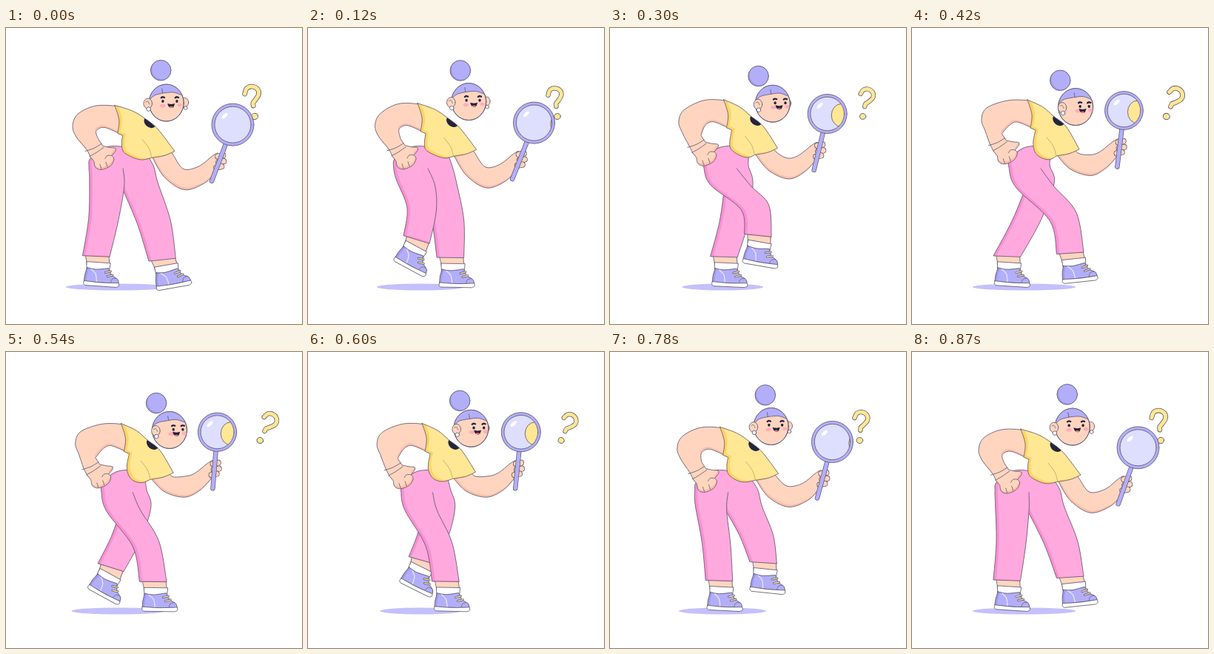
An HTML page with a canvas that plays this animation: 400 by 400 pixels, repeating every 900 ms.

```html
<!DOCTYPE html>
<html lang="en">
<head>
<meta charset="utf-8">
<title>Walking with a magnifying glass</title>
<style>
html, body { margin: 0; width: 100%; height: 100%; overflow: hidden; background: #fff; }
canvas { display: block; width: 400px; height: 400px; }
</style>
</head>
<body>
<canvas id="stage" width="400" height="400"></canvas>
<script>
const ctx = document.getElementById('stage').getContext('2d');
const LOOP = 900, STEP = 30, STRIDE = LOOP / 2;
const INK = '#595468', SKIN = '#ffd5c0', SKIN_DARK = '#fdbfa9', LILAC = '#b3aef9',
  LILAC_DARK = '#9f99ef', PINK = '#ffa9df', PINK_DARK = '#fa8fd1',
  YELLOW = '#ffe794', YELLOW_DARK = '#ffd466', DARK = '#24243c';

let time = 0;

// One swing per loop, highest at the given time.
const wave = (mean, amp, peak) => mean + amp * Math.cos(2 * Math.PI * (time - peak) / LOOP);
// Two bounces per loop, lowest on screen when a foot lands.
const bob = amp => amp * Math.cos(4 * Math.PI * time / LOOP);
const mix = (a, b, u) => a + (b - a) * u;
const mid = (a, b, dx = 0, dy = 0) => [mix(a[0], b[0], .5) + dx, mix(a[1], b[1], .5) + dy];
const smooth = u => {
  u = Math.min(1, Math.max(0, u));
  return u * u * (3 - 2 * u);
};
const rad = deg => deg * Math.PI / 180;
const at = (x, y) => (dx, dy) => [x + dx, y + dy];

// Appends a smooth curve through the points.
function spline(path, pts, join) {
  path[join ? 'lineTo' : 'moveTo'](...pts[0]);
  for (let i = 0; i < pts.length - 1; i++) {
    const b = pts[i], c = pts[i + 1], a = pts[i - 1] || b, d = pts[i + 2] || c;
    path.bezierCurveTo(b[0] + (c[0] - a[0]) / 6, b[1] + (c[1] - a[1]) / 6,
      c[0] - (d[0] - b[0]) / 6, c[1] - (d[1] - b[1]) / 6, ...c);
  }
  return path;
}
function joined(...runs) {
  const path = new Path2D();
  runs.forEach((run, i) => spline(path, run, i > 0));
  return path;
}
function closed(...runs) {
  const path = joined(...runs);
  path.closePath();
  return path;
}
function oval(x, y, rx, ry = rx, angle = 0) {
  const path = new Path2D();
  path.ellipse(x, y, rx, ry, angle, 0, 2 * Math.PI);
  return path;
}
function fill(path, color) {
  ctx.fillStyle = color;
  ctx.fill(path);
}
function stroke(path, color = INK, width = .8) {
  ctx.strokeStyle = color;
  ctx.lineWidth = width;
  ctx.stroke(path);
}
function paint(path, color) {
  fill(path, color);
  stroke(path);
}
function tube(path, color, width) {
  stroke(path, INK, width + 1.4);
  stroke(path, color, width);
}
function inside(path, draw) {
  ctx.save();
  ctx.clip(path);
  draw();
  ctx.restore();
}
function shaded(path, light, dark, dx, dy = 0) {
  fill(path, dark);
  inside(path, () => {
    ctx.translate(dx, dy);
    fill(path, light);
  });
}
function placed(x, y, deg, draw) {
  ctx.save();
  ctx.translate(x, y);
  ctx.rotate(rad(deg));
  draw();
  ctx.restore();
}

// Middle of the sole: it glides back on the ground, then swings forward in an arc.
function footPose(landing) {
  const s = (time - landing + LOOP) % LOOP;
  if (s <= STRIDE) {
    const u = s / STRIDE;
    return [mix(227, 128, u), 351 - 2 * u, 4 * u - 10 * Math.max(0, 1 - s / 90)];
  }
  const u = s / STRIDE - 1;
  return [mix(128, 227, smooth((u - .13) / .8)), 350 - 33 * Math.sin(Math.PI * u),
    mix(4, -10, u) + 28 * Math.sin(Math.PI * Math.sqrt(u))];
}

function hem([x, y, deg]) {
  const a = rad(deg), b = rad(deg * .6);
  const cx = x - 9 * Math.cos(a) + 40 * Math.sin(a);
  const cy = y - 9 * Math.sin(a) - 40 * Math.cos(a);
  const dx = 18.3 * Math.cos(b), dy = 18.3 * Math.sin(b);
  return [[cx - dx, cy - dy], [cx + dx, cy + dy]];
}

function drawShoe(pose) {
  placed(...pose, () => {
    paint(closed([[-24, -44], [8, -44]], [[10, -28], [-20, -28]]), SKIN);
    paint(closed([[-21, -32], [11, -32]], [[10, -20], [-20, -20]]), '#fff');
    const upper = closed([[-20, -24], [-8, -22.5], [9, -25]],
      [[9, -25], [14, -16], [22, -11], [24, -5]], [[-23, -5], [-22.5, -14], [-20, -24]]);
    shaded(upper, LILAC, LILAC_DARK, 3);
    stroke(upper);
    stroke(joined([[-14, -22], [-8, -16], [-6, -6]]), '#e6e4ff', 1.3);
    stroke(joined([[13, -6], [15, -11], [20, -12]]), INK, .6);
    for (const lace of [at(7, -19), at(10, -14)]) tube(joined([lace(-2, 0), lace(5, -2)]), YELLOW, 1.3);
    paint(closed([[-23, -6], [0, -5], [24, -6]], [[24, -6], [24.5, -2], [21, 0]],
      [[-21, 0], [-23.5, -2], [-23, -6]]), '#fff');
  });
}

function drawFarLeg() {
  const foot = footPose(0), [left, right] = hem(foot);
  const hip = [wave(199, 7, 830), 209], crotch = [155, 212];
  const sides = [
    [[188, 168], [hip[0] - 6, 186], hip, mid(hip, right, 5), right],
    [left, mid(crotch, left, 3), crotch]
  ];
  drawShoe(foot);
  shaded(closed(...sides, [[150, 170]]), PINK, PINK_DARK, 4);
  stroke(joined(...sides));
}

function drawNearLeg() {
  const foot = footPose(STRIDE), [left, right] = hem(foot);
  const waist = at(wave(121.5, 9.5, 440), 188), bend = wave(10.5, 8.5, 360);
  const hip = [wave(126.5, 14, 420), wave(210, 6, 470)];
  const seam = [wave(166, 8, 420), 190], thigh = [wave(175, 18, 370), 214];
  const outer = [[186, 168], waist(42, -28), waist(20, -26), waist(2, -12), waist(0, 0),
    hip, mid(hip, left, bend), left];
  const inner = [right, mid(thigh, right, bend * .55, -bend * .5), thigh, seam];
  drawShoe(foot);
  shaded(closed(outer, inner), PINK, PINK_DARK, 4, -1);
  stroke(joined(outer, inner));
}

function torsoPose() {
  return {
    shoulder: [wave(151.5, 4.7, 460), wave(99.2, 3.7, 10) + bob(1.5)],
    sleeve: [wave(227, 1, 0), wave(163.7, 1.2, 0) + bob(1.5)],
    belly: [wave(184.5, 2.7, 270), 176 + bob(2)]
  };
}

function glassPose() {
  const x = wave(296, 11, 45), y = wave(118.3, 11, 60) + bob(2.3);
  const endX = wave(278, 2.6, 680), endY = y + 78;
  return { x, y, r: wave(27.2, 1.3, 0), endX, endY, grip: [mix(x, endX, .64), mix(y, endY, .64)] };
}

function drawReachingArm({ sleeve: [ex, ey] }, { grip: [hx, hy] }) {
  const hand = at(hx, hy), sleeve = at(ex, ey);
  const arm = closed(
    [sleeve(-31, 7), [214, (hy + ey) / 2 + 28], [241, hy + 38], hand(-20, 29), hand(-5, 14)],
    [hand(2, 0), hand(-1, -11), hand(-9, -8), hand(-27, 6), [240, hy + 10], sleeve(-2, 5), sleeve(-8, -5)]);
  shaded(arm, SKIN, SKIN_DARK, 1, -3);
  stroke(arm);
}

function drawBentArm({ shoulder: [sx, sy] }) {
  const shoulder = at(sx, sy);
  const elbow = at(wave(92, 2, 460), wave(128, 4.5, 40));
  const fist = at(wave(129, 2.2, 70), wave(172.5, 4, 30));
  const arm = closed(
    [shoulder(8, 6), shoulder(0, 1), shoulder(-27, 1), elbow(7, -16), elbow(0, 0), elbow(5, 15), fist(-22, -12), fist(-17, -2)],
    [fist(-12, 4), fist(-10, 12), fist(-2, 15), fist(10, 10), fist(15, 1), fist(12, -4)],
    [fist(17, -10), fist(17, -14), fist(9, -15), fist(0, -17)],
    [fist(-6, -26), shoulder(-25, 35), shoulder(-14, 30), shoulder(6, 38)]);
  shaded(arm, SKIN, SKIN_DARK, -1, -3);
  stroke(arm);
  stroke(joined([fist(-24, -10), fist(-12, -14), fist(-2, -20)]));
  stroke(joined([fist(-18, -3), fist(-9, -8), fist(1, -15)]));
  stroke(joined([fist(12, -4), fist(6, -4), fist(3, 0)]));
  for (const knuckle of [fist(-3, 11), fist(5, 8)]) {
    const [x, y] = knuckle;
    stroke(joined([[x - 1, y - 3], knuckle, [x + 1, y + 3]]));
  }
}

function drawShirt({ shoulder: [sx, sy], sleeve: [ex, ey], belly: [bx, by] }) {
  const shoulder = at(sx, sy), sleeve = at(ex, ey), belly = at(bx, by);
  const neck = at(sx * .4 + 129, sy * .4 + 80.5), side = sx * .8 + 38;
  const shirt = closed(
    [[sx, sy], mid([sx, sy], neck(0, 0), 3, -1.5), neck(0, 0), neck(17, 14), [ex, ey]],
    [[ex, ey], sleeve(-14, 6), sleeve(-31, 9)],
    [sleeve(-31, 9), belly(0, 0), belly(-12, -3), [side + 3, by - 11], [side + 1, 154], shoulder(11, 41)],
    [shoulder(4, 38), shoulder(6, 20), [sx, sy]]);
  shaded(shirt, YELLOW, YELLOW_DARK, 4, -2);
  inside(shirt, () => fill(oval(...neck(7, 5), 9, 7, .7), DARK));
  stroke(shirt);
  stroke(joined([sleeve(-31, 9), sleeve(-35, -4), sleeve(-44, -16)]), '#b99a58', .7);
}

function drawEar(x, y, size, pearl) {
  paint(oval(x, y, size, size + 1.2), SKIN);
  if (pearl) paint(oval(x + 1, y + 7.5, pearl), '#fff');
}

function drawFace(turn) {
  drawEar(25 - 7 * turn, -.5, 5, turn < .7 && 2.4);
  const face = oval(0, 0, 23.5, 25);
  paint(face, SKIN);
  const part = -5 + 4 * turn;
  const fringe = joined([[-24, -3], [-16, -10], [part, -13]], [[part, -13], [10, -14], [24, -9]],
    [[26, -30], [-26, -30]]);
  inside(face, () => paint(fringe, LILAC));
  stroke(face);
  stroke(joined([[part, -13], [part - 1, -19]]));

  const earX = -25 + 7 * turn;
  drawEar(earX, 1, 5.8, 2.8);
  stroke(joined([[earX - 3, -1], [earX, -2], [earX + 2, 2]]), INK, .7);

  ctx.translate(0, 1.5 * turn);
  for (const x of [-5 + 11 * turn, 14 + 4 * turn]) {
    stroke(joined([[x - 2, -6.8], [x, -7.8], [x + 2.2, -7.2]]), DARK, 2.3);
    fill(oval(x + .2, -2, 1.7, 2), DARK);
  }
  fill(oval(-5 + 8 * turn, 4, 3.6, 2.4), '#ffadb8');
  fill(oval(18 + 2 * turn, 3, 3, 2.4), '#ffadb8');
  const lip = at(6.5 + 3 * turn, 1);
  const mouth = closed([lip(-5, 0), lip(0, 1), lip(5, 0)],
    [lip(5, 0), lip(3, 5), lip(0, 6), lip(-3.5, 4), lip(-5, 0)]);
  fill(mouth, DARK);
  inside(mouth, () => fill(oval(...lip(0, 6), 3, 2.2), '#f4777f'));
}

function drawHead() {
  const bun = oval(wave(205, 5, 820), wave(62.7, 7, 460) + bob(1.5), 13.8);
  shaded(bun, LILAC, LILAC_DARK, 2, -1.5);
  stroke(bun);
  placed(wave(219, 2.3, 470), wave(102.2, 3, 480) + bob(1.8), 0, () => drawFace(wave(.5, .5, 455)));
}

function drawQuestionMark() {
  placed(wave(340, 4, 460), 119.5, wave(4.5, 17.5, 510), () => {
    const scale = 1.1 + bob(.06);
    ctx.scale(scale, scale);
    tube(joined([[-6, -28], [-3, -33.5], [3, -35], [9, -31.5], [10, -25], [5, -19], [1.5, -16], [1, -12.5]]), YELLOW, 4.4);
    paint(oval(0, 0, 3.9, 3.6), YELLOW);
  });
}

function drawMagnifier({ x, y, r, endX, endY, grip }) {
  const hand = at(...grip), u = r / Math.hypot(endX - x, endY - y);
  for (const [dx, dy] of [[4, -8], [5, 0], [2, 7]]) tube(joined([hand(dx - 6, dy + 1), hand(dx + 1, dy - .5)]), SKIN, 6.6);
  tube(joined([[mix(x, endX, u), mix(y, endY, u)], [endX, endY - 2]]), LILAC, 5);
  paint(oval(x, y, r), LILAC);
  const glass = oval(x, y, r * .86);
  fill(glass, '#dedeff');
  inside(glass, () => paint(oval(x + wave(27.5, 13, 0) + bob(4), y + 2, 13.5, 15.5), YELLOW));
  stroke(glass);
  fill(oval(x - r * .38, y - r * .42, 5, 2.2, -.75), '#fff');
}

function draw() {
  ctx.clearRect(0, 0, 400, 400);
  ctx.lineCap = ctx.lineJoin = 'round';
  const torso = torsoPose(), glass = glassPose();
  fill(oval(152 - bob(.5), 350, 60 + bob(10.5), 4.6), '#c4c0fb');
  drawFarLeg();
  drawNearLeg();
  drawReachingArm(torso, glass);
  drawBentArm(torso);
  drawShirt(torso);
  drawHead();
  drawQuestionMark();
  drawMagnifier(glass);
}

const start = performance.now();
function frame() {
  time = Math.floor((performance.now() - start) % LOOP / STEP) * STEP;
  draw();
  requestAnimationFrame(frame);
}
frame();
</script>
</body>
</html>
```
